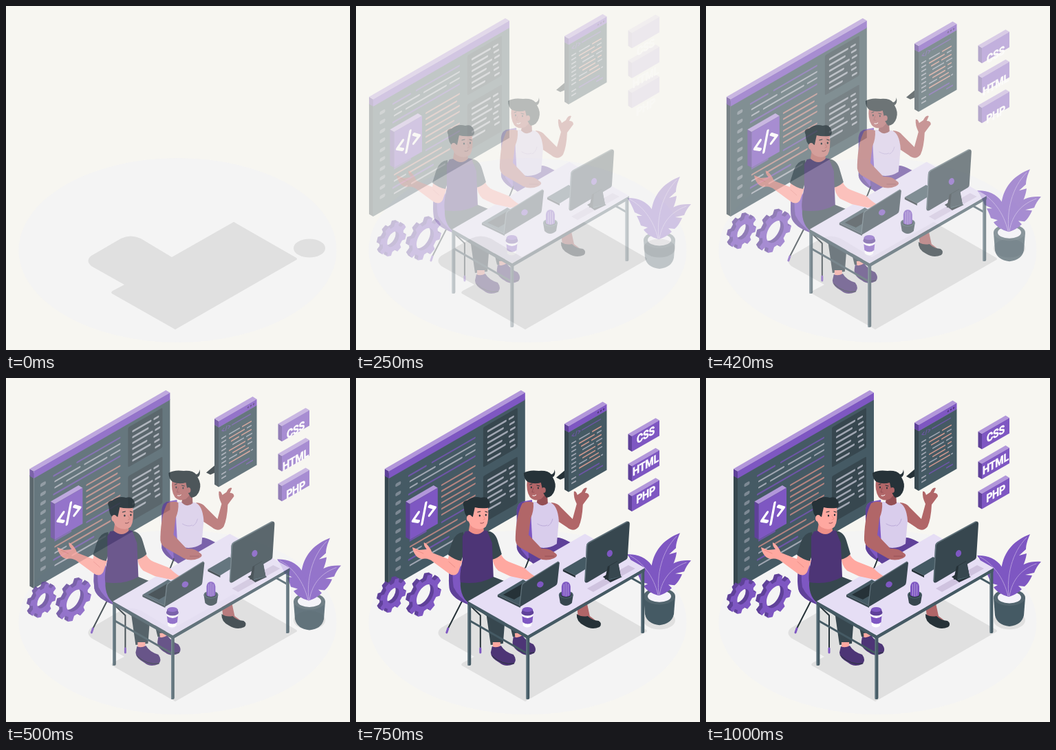
An HTML page that plays this animation: 500x500 px, repeating every 1040 ms.

```html
<!DOCTYPE html>
<html lang="en">
<head>
<meta charset="utf-8">
<title>Developers at work</title>
<style>
html, body { margin: 0; width: 100%; height: 100%; overflow: hidden; background: #f7f6f1; }
svg { display: block; width: 100vw; height: 100vh; }
text { font: 700 16.5px Roboto, "Liberation Sans", sans-serif; letter-spacing: -.3px; text-anchor: middle;
  fill: #fff; stroke: #fff; stroke-width: .5; }
</style>
</head>
<body>
<svg id="stage" viewBox="0 0 500 500"></svg>
<script>
const K = 0.577;
const DARK = '#37474f', SLATE = '#455a64', INK = '#263238', PURPLE = '#7e57c2', LILAC = '#b297da',
  PLUM = '#4d3576', VIOLET = '#5f4199', PALE = '#e6def5', PINK = '#ffa8a0', ROSE = '#ee8f88',
  BROWN = '#b16668', COCOA = '#944f54', GREY = '#a0a6b2', CORAL = '#b58480', DIM = '#6e55a8';

const path = (d, fill) => `<path d="${d}" fill="${fill}"/>`;
const line = (d, color, w = 1) =>
  `<path d="${d}" fill="none" stroke="${color}" stroke-width="${w}" stroke-linecap="round" stroke-linejoin="round"/>`;
const oval = (x, y, rx, ry, fill, turn = 0) =>
  `<ellipse cx="${x}" cy="${y}" rx="${rx}" ry="${ry}" fill="${fill}" transform="rotate(${turn} ${x} ${y})"/>`;
const wall = (x, y, body) => `<g transform="matrix(1 -${K} 0 1 ${x} ${y})">${body}</g>`;
const iso = (x, y, body) => `<g transform="matrix(.866 -.5 0 1 ${x} ${y})">${body}</g>`;
const bar = (x, y, w, color, h = 2.4) =>
  `<rect x="${x}" y="${y - h / 2}" width="${w}" height="${h}" rx="${h / 2.5}" fill="${color}"/>`;
const rows = (n, make) => Array.from({ length: n }, (_, i) => make(i)).join('');
// A part that slides in along (dx, dy) while fading in.
const part = (dx, dy, body) => `<g class="part" data-dx="${dx}" data-dy="${dy}">${body}</g>`;

function slab(x, y, w, h, depth, front, top, side) {
  const rise = K * w, back = `l${-depth} ${-0.6 * depth}`, fore = `l${depth} ${0.6 * depth}`;
  return path(`M${x} ${y}${back}v${h}${fore}z`, side) +
    path(`M${x} ${y}${back}l${w} ${-rise}${fore}z`, top) +
    path(`M${x} ${y}l${w} ${-rise}v${h}l${-w} ${rise}z`, front);
}

function gear(x, y, r, hole) {
  const teeth = 8, pts = [];
  for (let i = 0; i < teeth; i++)
    for (const [a, k] of [[-.3, .78], [-.2, 1], [.2, 1], [.3, .78]]) {
      const t = (i + a + .4) * 2 * Math.PI / teeth;
      pts.push((r * k * Math.cos(t)).toFixed(1) + ' ' + (r * k * Math.sin(t)).toFixed(1));
    }
  const d = `M${pts.join('L')}zM${hole} 0A${hole} ${hole} 0 1 0 ${-hole} 0A${hole} ${hole} 0 1 0 ${hole} 0z`;
  const layer = (i, fill) => iso(x - i, y - i * .6, `<path d="${d}" fill="${fill}" fill-rule="evenodd"/>`);
  return rows(5, i => layer(5 - i, VIOLET)) + layer(0, PURPLE);
}

const floor = oval(249.5, 355, 231, 134, '#f4f4f4') +
  path('M329 315Q331 313 333 315L422 366Q424 368 422 369L248 469Q246 471 244 469L154 418Q152 416 155 414L172 405L124 378Q115 370 124 363L167 338Q181 331 196 338L241 365z', '#e0e0e0') +
  oval(441, 352, 23, 13.5, '#e0e0e0');

function screenCode() {
  let s = '';
  const panel = (y, h) => `<rect x="137" y="${y}" width="50" height="${h}" rx="2" fill="${DARK}"/>`;
  s += panel(13, 58) + panel(84, 68);
  for (const top of [22.5, 94])
    s += rows(6, i => bar(143, top + 8.5 * i, [28, 24, 30, 22, 27, 20][i], GREY, 3) +
      bar(174 + i % 3, top + 8.5 * i, 8, GREY, 3));
  s += rows(10, i => bar(9.5, 24 + 13.6 * i, 8, '#7d8994', 5));
  s += bar(28, 21, 27, DIM) + bar(62, 21, 64, DIM);
  s += bar(30, 30, 38, GREY) + bar(73, 30, 53, GREY);
  s += bar(30, 39, 12, GREY) + bar(47, 39, 60, GREY) + bar(111, 39, 15, GREY);
  s += bar(28, 48, 98, DIM);
  s += rows(6, i => bar(76, 62 + 8.6 * i, [50, 46, 50, 50, 42, 50][i], CORAL));
  s += bar(76, 116, 50, DIM) + bar(30, 116, 25, DIM);
  s += bar(30, 125, 70, CORAL) + bar(30, 134, 18, GREY) + bar(52, 134, 60, CORAL);
  s += bar(28, 143, 60, DIM) + bar(30, 152, 20, GREY) + bar(55, 152, 50, GREY);
  return s;
}

const screen = slab(46, 145, 198, 161, 6, SLATE, SLATE, DARK) +
  slab(46, 135.5, 198, 10.5, 6, PURPLE, LILAC, VIOLET) + wall(46, 138, screenCode()) +
  slab(76.5, 183, 40.5, 52, 6, PURPLE, LILAC, VIOLET) +
  wall(97, 197, line('M-8 -6L-16 1L-8 7M8 -6L16 1L8 7', '#fff', 4.2) + line('M-3 14L3 -14', '#fff', 3.6));

const popup = path('M291 143L304 132V143L297 146z', INK) +
  slab(309, 77, 55.5, 87, 6, SLATE, SLATE, DARK) +
  slab(309, 68.3, 55.5, 9, 6, PURPLE, LILAC, VIOLET) +
  wall(309, 69,
    rows(3, i => oval(43 + 4 * i, 4, 1.2, 1.2, PLUM)) +
    line('M8 14l-3 2l3 2M10 19l2 -6M14 14l3 2l-3 2', DIM, 1.2) + bar(19, 16, 28, DIM, 1.6) +
    rows(8, i => bar(4, 27 + 6 * i, 7, GREY, 2) +
      bar([15, 15, 18, 20, 15, 20, 15, 15][i], 27 + 6 * i, [16, 23, 12, 17, 24, 19, 12, 31][i], i % 3 ? '#ce978d' : GREY, 1.8) +
      bar([34, 41, 33, 40, 42, 42, 30, 47][i], 27 + 6 * i, [14, 7, 15, 9, 6, 7, 14, 3][i], i % 2 ? GREY : '#ce978d', 1.8)) +
    bar(4, 79, 7, GREY, 2) + bar(15, 79, 30, DIM, 1.8) + bar(4, 85, 7, GREY, 2) + bar(40, 85, 10, DIM, 1.8));

const labels = ['CSS', 'HTML', 'PHP'];
const chips = rows(3, i => slab(401, 81 + 43.5 * i, 40, 22.5, 5.5, PURPLE, LILAC, VIOLET));
const chipText = labels.map((s, i) => iso(421, 86.5 + 43.5 * i, `<text>${s}</text>`)).join('');

const gears = gear(54, 318, 22.5, 10) + gear(100.5, 318, 27.5, 14.5);

const plant = path('M418 319L420 345Q423 359 441 361Q459 359 462 345L464 319z', SLATE) +
  oval(441, 319, 23, 12, '#53666f') + oval(441, 319, 17, 8.5, '#f5f3fa') +
  path('M440 318C421 290 425 244 471 227C467 236 465 243 465 249L455 258L466 255C465 264 461 273 458 279L448 286L456 284C452 298 447 309 440 318z', PURPLE) +
  path('M440 318C441 282 456 265 487 267C482 272 479 278 477 283L464 286L474 287C471 294 467 300 463 303L454 302L459 307C453 313 447 316 440 318z', PURPLE) +
  path('M440 318C429 315 422 310 418 304L424 301L414 298C412 292 410 288 408 284L416 284L405 279C402 272 399 264 394 258C425 257 441 279 440 318z', PURPLE) +
  line('M440 317C437 288 444 254 466 232M441 317C445 292 460 277 480 270M439 317C433 290 416 269 398 260', LILAC, 1);

const womanBack =
  path('M232 196Q231 184 239 180L254 177L262 245L252 267Q234 258 232 247z', PURPLE) +
  path('M232 196Q231 184 239 180L243 180Q236 187 237 197L238 249L252 267Q234 258 232 247z', VIOLET) +
  line('M250 262L244 277', INK, 2) +
  path('M250 243C265 232 288 228 302 235L316 242L330 300L324 330L300 300L280 262L256 270Q246 265 250 243z', VIOLET) +
  path('M319 329L333 323L338 346L346 352L321 347z', BROWN) +
  path('M319 343Q326 348 335 346Q341 352 351 353Q357 357 352 362Q341 367 330 360Q318 354 319 343z', INK) +
  path('M282 181Q292 182 296 188L313 205L319 183Q314 173 315 165Q318 164 320 170L326 166Q330 158 334 160L331 167Q337 167 337 172L328 184Q327 205 322 216Q315 225 305 217L284 203z', BROWN) +
  path('M252 181Q263 178 280 181Q291 184 293 207L290 241Q275 251 255 244L253 210z', '#d9cdec') +
  path('M263 168L276 165L277 182Q269 189 261 181z', COCOA) +
  line('M262 212Q270 217 276 214M284 205Q282 213 277 215', '#bcabd9') +
  path('M247 148Q245 164 251 173Q257 180 267 176L277 166L279 145z', BROWN) +
  path('M242 138Q250 133 264 135Q277 134 282 140Q286 140 287 133Q289 142 284 144Q290 154 287 163Q284 173 275 174Q270 169 269 161L267 152Q257 155 248 151Q242 147 242 138z', INK) +
  oval(271, 163, 3, 4, BROWN) + oval(253, 159, 1, 1.4, INK) + oval(263, 160, 1, 1.4, INK) +
  line('M251 155l3 -1M261 156l4 1', INK) + line('M256 160l-2 6l3 0', COCOA) + line('M255 171Q258 172 260 170', '#fff', 1);

const womanArm =
  path('M240 182Q248 178 256 181Q257 193 252 204L249 228L268 248Q280 247 287 254Q294 258 286 262Q274 267 264 262L236 246Q229 241 230 231Q231 199 240 182z', BROWN) +
  line('M273 259L286 259', COCOA);

const manBack =
  line('M153 323L132 364M156 323L179 345V392', INK, 2) + line('M132 364L130 370M179 393V399', PURPLE, 3) +
  path('M138 265L150 270L158 302L178 316L164 330Q137 321 134 306Q131 284 138 265z', PURPLE) +
  path('M138 265L141 266Q137 286 140 304Q146 317 164 330Q137 321 134 306Q131 284 138 265z', VIOLET) +
  path('M150 296Q165 287 198 289L216 296Q240 306 242 328L237 378L226 376L216 334L212 386L194 388L188 346L166 330Q149 320 150 296z', DARK) +
  path('M197 384H208V395H197zM229 371L239 370L242 382L230 382z', PINK) +
  path('M196 390Q202 393 209 389Q214 398 227 402Q233 410 227 416Q215 421 207 414Q194 407 194 399z', PLUM) +
  path('M227 376Q233 379 240 374Q246 383 256 387Q262 395 257 400Q246 406 237 399Q224 392 226 382z', PLUM) +
  line('M196 404Q211 418 228 415M227 389Q242 404 257 399', INK, 1);

const manTop =
  path('M134 255L153 265L147 282Q142 290 133 284L110 267Q103 261 94 263Q83 261 80 246L90 250L101 249Q96 243 97 239Q104 242 109 254L132 263z', PINK) +
  path('M196 258L208 254Q212 264 220 267L243 276Q251 284 258 288L255 292L245 293L222 288L205 280Q197 273 196 258z', PINK) +
  path('M154 224Q143 225 138 238L132 257Q141 264 151 266L157 250z', DARK) +
  path('M188 222Q200 223 204 236L210 256Q204 262 196 264L187 245z', DARK) +
  path('M157 223Q175 219 189 222L196 240L198 289Q177 301 150 297Q148 287 153 264L153 230z', PLUM) +
  path('M164 210L183 212L184 222Q174 232 162 222z', ROSE) +
  path('M162 186Q158 211 168 217Q179 223 187 216Q192 208 190 188z', PINK) +
  path('M155 187Q151 179 160 178Q169 171 180 174Q188 171 192 179Q195 187 189 189Q178 190 171 188L168 202Q163 199 161 203Q155 198 155 187z', INK) +
  oval(163, 204, 4, 5, PINK) + oval(178, 200, 1.2, 1.6, INK) + oval(187, 199, 1.2, 1.6, INK) +
  line('M175 195l4 -1M186 194l3 1', INK, 1.2) + line('M183 200l3 5l-3 1', ROSE) +
  line('M179 211Q182 212 184 210', COCOA, 1) + line('M85 250l11 5M142 275l-9 -8', ROSE);

const leg = (x, y, h) => `<rect x="${x - 2.4}" y="${y}" width="4.8" height="${h}" rx="2" fill="${SLATE}"/>` +
  `<rect x="${x - 2.4}" y="${y}" width="1.6" height="${h}" fill="#607680"/>`;
const table =
  line('M164 353L248 401M399 291L415 300', SLATE, 3) +
  leg(163, 326, 92) + leg(415, 279, 92) + leg(248, 375, 92) +
  path('M161 324.5L248 374L418 276V281L248 379.5L161 330z', SLATE) +
  path('M331 226.5L418 276L248 374L161 324.5z', PALE) +
  path('M334 306L394 272L404 277L343 311z', '#cfc3df');

const laptop =
  path('M204 315L241 293L271 310L237 331z', SLATE) + path('M212 315L240 299L254 307L228 322z', INK) +
  path('M204 315L237 331V334L204 318z', DARK);
const lid =
  path('M239 304Q239 300 242 298L290 268Q294 266 294 269L291 297Q291 300 288 302L236 333z', DARK) +
  line('M236 331L239 304Q239 300 242 298L292 267', '#60727b', 1.3) + oval(266, 300, 5, 4.2, PURPLE, -30);

const monitor =
  path('M299 278L330 260L346 269L317 287z', SLATE) + path('M299 278L317 287V290L299 281z', INK) +
  path('M357 289L369 282L385 289L368 297z', INK) + path('M363 273L378 263L383 289L366 294z', SLATE) +
  path('M333 244Q333 241 336 239L391 209Q396 207 396 212L393 260Q393 263 389 265L335 297Q330 299 331 294z', DARK) +
  line('M331 295L334 244Q334 241 337 239L392 209', '#60727b', 1.6) +
  path('M364 274L378 266L383 288L360 293z', INK) + path('M367 273L379 266L383 288L365 292z', DARK) +
  oval(367, 255, 4, 5, PURPLE, 20);

const cup = path('M239 340L241 360Q247 365 253 360L256 340z', '#fff') +
  path('M239.5 346Q248 352 255.5 346L254.5 355Q248 360 240.5 355z', PURPLE) +
  oval(247.5, 341, 9, 4.5, VIOLET) + path('M240 336H255L256 341H239z', VIOLET) + oval(247.5, 336.5, 7.5, 3.5, PURPLE);

const cactus = path('M293 315L295 327Q303 335 312 327L314 315z', DARK) +
  oval(303.5, 315, 10.5, 5.5, SLATE) + oval(303.5, 315, 8, 4, INK) +
  path('M297 316V303Q298 296 303.5 296Q309 296 310 303V316Q303.5 320 297 316z', PURPLE) +
  line('M300.5 300V316M303.5 298V317M306.5 300V316', LILAC, 1);

const team = womanBack + manBack + table + womanArm + laptop + manTop + lid + monitor + cactus + cup;

// The chips sit in two nested parts, so they travel and fade twice as much as their labels.
const stage = document.getElementById('stage');
stage.innerHTML = floor + part(1, 0, screen) + part(0, 1, popup) + part(0, 1, part(0, 1, chips) + chipText) +
  part(0, -1, gears) + part(0, -1, plant) + part(1, 0, team);
const parts = [...stage.querySelectorAll('.part')];

const LOOP = 1040, LEAD = 37, SLIDE = 30;
const bezier = (s, a, b) => 3 * (1 - s) ** 2 * s * a + 3 * (1 - s) * s * s * b + s ** 3;
// Overshooting ease: cubic-bezier(.36, -.01, .5, 1.38)
function ease(x) {
  let lo = 0, hi = 1;
  for (let i = 0; i < 24; i++) {
    const mid = (lo + hi) / 2;
    if (bezier(mid, .36, .5) < x) lo = mid; else hi = mid;
  }
  return bezier(lo, -.01, 1.38);
}

function draw(now) {
  const t = now % LOOP;
  const k = t < LEAD ? 0 : ease(Math.min(1, (t + LEAD) / 1000)), d = SLIDE * (k - 1);
  for (const p of parts) {
    p.setAttribute('transform', `translate(${d * p.dataset.dx} ${d * p.dataset.dy})`);
    p.setAttribute('opacity', Math.max(0, Math.min(1, k)));
  }
  requestAnimationFrame(draw);
}
draw(performance.now());
</script>
</body>
</html>
```
